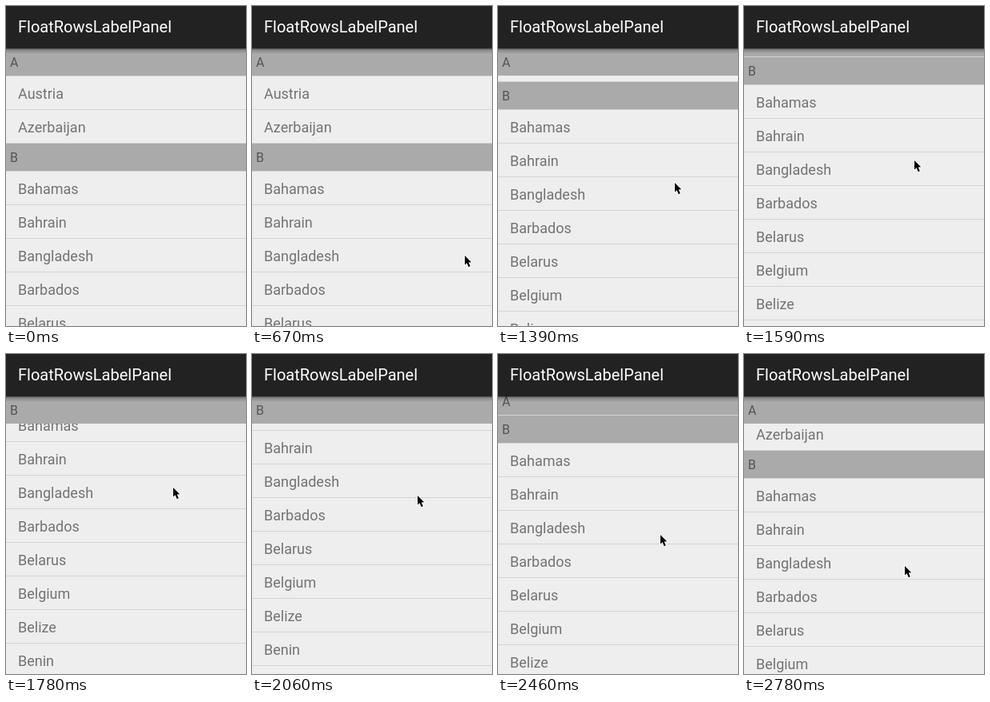
These frames come from a looping animation (300x400 px, 2800 ms). An HTML page with a canvas:

```html
<!DOCTYPE html>
<html lang="en">
<head>
<meta charset="utf-8">
<title>Sticky list headers</title>
<style>
  html, body { margin: 0; width: 100%; height: 100%; overflow: hidden; background: #eee; }
  canvas { display: block; width: 300px; height: 400px; }
</style>
</head>
<body>
<canvas id="stage" width="300" height="400"></canvas>
<script>
const ctx = document.getElementById('stage').getContext('2d');
const WIDTH = 300, HEIGHT = 400, LOOP = 2800, STEP = 40;
const BAR = 53, HEADER = 34, ROW = 41, DIVIDER = 1;
const DRAG_START = 670, TURN = 1870, DRAG_END = 2780, RESUME = 1740;

const sections = [
  { letter: 'A', items: ['Austria', 'Azerbaijan'] },
  { letter: 'B', items: ['Bahamas', 'Bahrain', 'Bangladesh', 'Barbados', 'Belarus',
                         'Belgium', 'Belize', 'Benin', 'Bhutan'] }
];
const cursorShape = new Path2D('M0 0V11.5L2.6 9.2L4.7 14.2L6.8 13.3L4.7 8.4L8.2 8.2Z');

const mix = (from, to, u) => from + (to - from) * u;
const progress = (t, start, end) => Math.min(1, Math.max(0, (t - start) / (end - start)));

// The pointer drags up to the turning point, then back down.
function cursorAt(t) {
  const up = progress(t, DRAG_START, TURN), down = progress(t, TURN, DRAG_END);
  return t < TURN
    ? { x: mix(208, 266, (1 - up) ** 1.63), y: mix(312, 154, up ** 1.08) }
    : { x: mix(208, 201, down), y: mix(154, 265, down) };
}

// The list follows the pointer late and rests briefly at its furthest scroll.
function scrollAt(t) {
  const furthest = 157;
  const up = mix(0, furthest, progress(t, 860, 1895) ** 1.06);
  const down = mix(51, furthest, progress(t, DRAG_END, 2034) ** 1.04);
  return Math.round(Math.min(up, down));
}

// The screen updates in steps, with one longer pause before RESUME.
function screenTime(t) {
  const origin = t < RESUME ? DRAG_START : RESUME;
  const stepped = origin + Math.floor((t - origin) / STEP) * STEP;
  return t < RESUME ? Math.min(stepped, RESUME - 70) : stepped;
}

function rect(y, height, color) {
  ctx.fillStyle = color;
  ctx.fillRect(0, y, WIDTH, height);
}

function label(text, x, baseline, size, color) {
  ctx.font = `${size}px Roboto, sans-serif`;
  ctx.fillStyle = color;
  ctx.fillText(text, x, baseline);
}

function drawHeader(letter, y) {
  rect(y, HEADER, '#aaa');
  label(letter, 5, y + 23, 16, '#555');
}

function drawList(scroll) {
  let y = BAR - scroll;
  const tops = [];
  const divide = () => {
    rect(y, DIVIDER, '#d3d3d3');
    y += DIVIDER;
  };
  for (const { letter, items } of sections) {
    tops.push(y);
    drawHeader(letter, y);
    y += HEADER;
    divide();
    for (const item of items) {
      label(item, 15, y + 28, 18, '#737373');
      y += ROW;
      divide();
    }
  }
  // The current header sticks until the next one pushes it away.
  const current = tops.findLastIndex(top => top <= BAR);
  const next = tops[current + 1] ?? Infinity;
  drawHeader(sections[current].letter, Math.min(BAR, next - HEADER - DIVIDER));
}

function drawBar() {
  const shadow = ctx.createLinearGradient(0, BAR, 0, BAR + 7);
  shadow.addColorStop(0, 'rgba(0,0,0,.55)');
  shadow.addColorStop(0.3, 'rgba(0,0,0,.2)');
  shadow.addColorStop(1, 'rgba(0,0,0,0)');
  rect(BAR, 7, shadow);
  rect(0, BAR, '#222');
  label('FloatRowsLabelPanel', 15, 33, 20, '#fff');
}

function drawCursor({ x, y }) {
  ctx.save();
  ctx.translate(Math.round(x), Math.round(y));
  ctx.strokeStyle = '#fff';
  ctx.lineWidth = 1.5;
  ctx.stroke(cursorShape);
  ctx.fillStyle = '#000';
  ctx.fill(cursorShape);
  ctx.restore();
}

function draw(now) {
  const t = screenTime(now % LOOP);
  rect(0, HEIGHT, '#eee');
  drawList(scrollAt(t));
  drawBar();
  if (t >= DRAG_START) drawCursor(cursorAt(t));
}

const start = performance.now();
function tick() {
  draw(performance.now() - start);
  requestAnimationFrame(tick);
}
tick();
</script>
</body>
</html>
```
